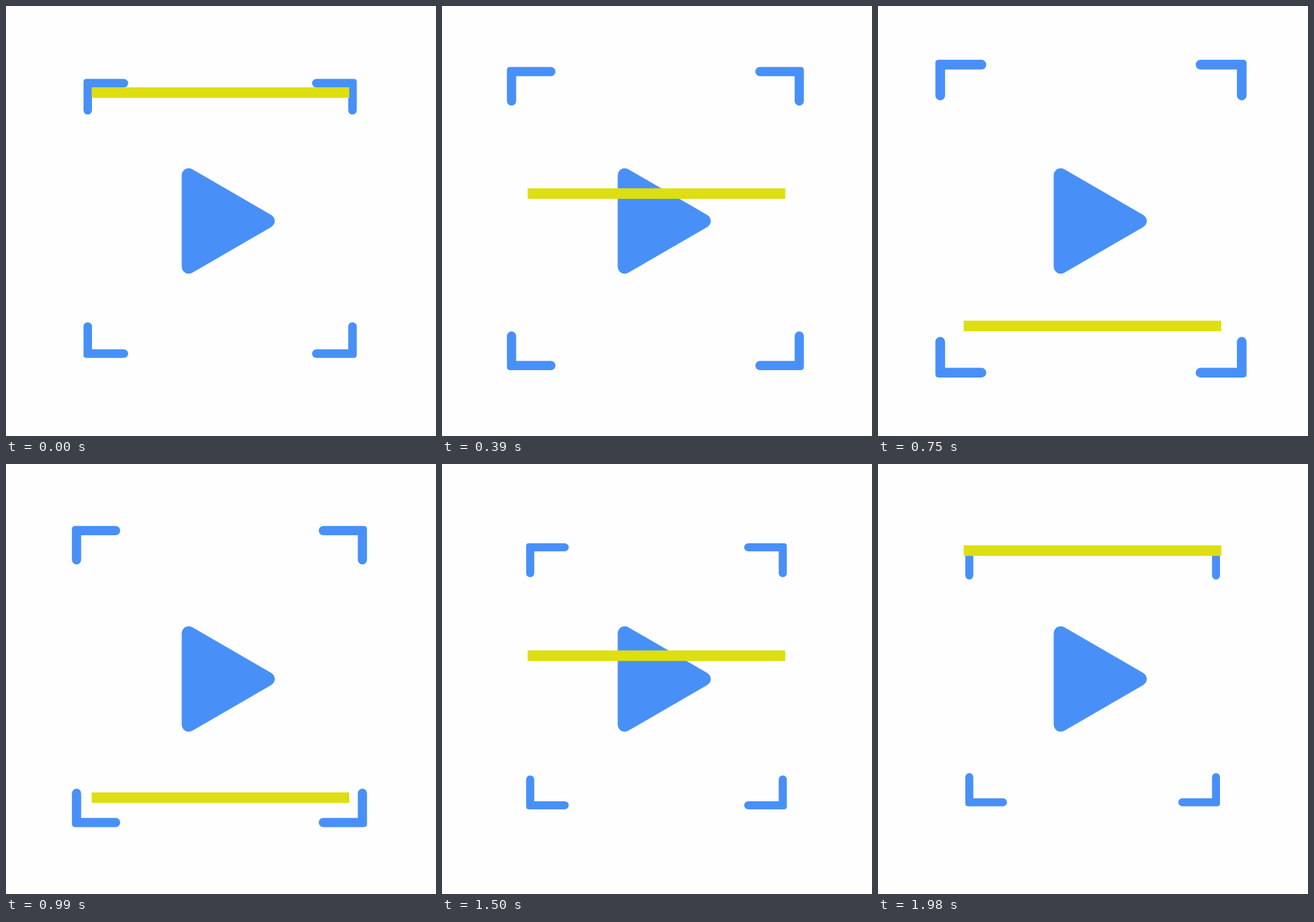
These frames come from a looping animation (640x640 px, 2190 ms). An HTML page:

```html
<!DOCTYPE html>
<html lang="en">
<head>
<meta charset="utf-8">
<title>Scan frame</title>
<style>
  html, body { margin: 0; width: 100%; height: 100%; overflow: hidden; background: #fefefe; }
  svg { display: block; width: 100%; height: 100%; }
  .blue { fill: #4890f7; stroke: #4890f7; }
  .bar { fill: #dddf11; }
</style>
</head>
<body>
<svg viewBox="0 0 640 640">
  <defs>
    <path id="corner" d="M0 4Q0 0 4 0H56.1a5.9 5.9 0 0 1 0 11.8H11.8V43.5a5.9 5.9 0 0 1-11.8 0Z"/>
  </defs>
  <path class="blue" d="M272 252V388L389.5 320Z" stroke-width="21" stroke-linejoin="round"/>
  <g id="brackets" class="blue" stroke-width="0">
    <use href="#corner" transform="translate(130 122.5)"/>
    <use href="#corner" transform="translate(509 122.5) scale(-1 1)"/>
    <use href="#corner" transform="translate(130 509.4) scale(1 -1)"/>
    <use href="#corner" transform="translate(509 509.4) scale(-1 -1)"/>
  </g>
  <rect id="bar" class="bar" x="127.5" y="121.1" width="383.4" height="15.7"/>
</svg>
<script>
  const LOOP = 2190, STEP = 30;
  const brackets = document.getElementById('brackets');
  const bar = document.getElementById('bar');

  // Keys are [time, value]
  const scaleKeys = [[0, 1.073], [690, 1.238], [1590, 1]];
  const barKeys = [[0, 0], [900, 375], [1980, 0]];

  const linear = u => u;
  const smooth = u => u * u * (3 - 2 * u);

  function valueAt(keys, t, ease) {
    for (let i = 1; i < keys.length; i++) {
      const [t0, a] = keys[i - 1], [t1, b] = keys[i];
      if (t <= t1) return a + (b - a) * ease((t - t0) / (t1 - t0));
    }
    return keys[keys.length - 1][1];
  }

  function draw(time) {
    const t = Math.floor((time % LOOP) / STEP) * STEP;
    const s = valueAt(scaleKeys, t, linear);
    brackets.setAttribute('transform',
      `translate(330.8 313.4) scale(${s}) translate(-330.8 -313.4)`);
    bar.setAttribute('transform', `translate(0 ${valueAt(barKeys, t, smooth)})`);
  }

  const start = performance.now();
  function tick() {
    draw(performance.now() - start);
    requestAnimationFrame(tick);
  }
  tick();
</script>
</body>
</html>
```
